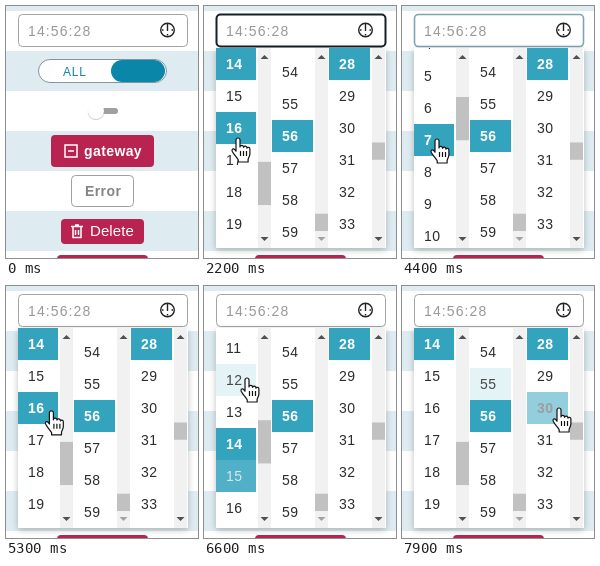
An HTML page for the animation above (8 s loop, 192 px wide and 252 px high).

```html
<!DOCTYPE html>
<html lang="en">
<head>
<meta charset="utf-8">
<title>Time picker</title>
<style>
  html, body { margin: 0; width: 100%; height: 100%; overflow: hidden; background: #fff; }
  svg { display: block; }
  text { font: 14px "Liberation Sans", Arial, sans-serif; letter-spacing: .4px; }
  .bold { font-weight: bold; }
  .stripe { fill: #deecf1; }
  .berry { fill: #b8234f; }
  .line { fill: none; stroke: #fff; stroke-width: 1.5; }
  #value { fill: #999; letter-spacing: 1.1px; }
  #popup { filter: drop-shadow(0 2px 3px rgba(0, 0, 0, .25)); }
</style>
</head>
<body>
<svg id="stage" width="192" height="252" viewBox="0 0 192 252">
  <rect width="192" height="252" fill="#fff"/>
  <path class="stripe" d="M0 0h192v5H0zM0 45h192v40H0zM0 125h192v40H0zM0 205h192v40H0z"/>

  <rect x="32.5" y="53.5" width="128" height="23" rx="11.5" fill="#fff" stroke="#84969c"/>
  <rect x="105" y="54" width="54" height="22" rx="11" fill="#0a87a8"/>
  <text x="57" y="70" fill="#0a87a8" style="font-size:12px;letter-spacing:.8px">ALL</text>

  <rect x="86" y="102" width="26" height="6" rx="3" fill="#a0a0a0"/>
  <circle cx="90" cy="106" r="8.3" fill="#000" opacity=".18"/>
  <circle cx="90" cy="105" r="8" fill="#fff"/>

  <rect class="berry" x="45" y="129" width="103" height="32" rx="4"/>
  <path class="line" d="M59 139h12v12H59zM62 145h6"/>
  <text class="bold" x="78" y="150" fill="#fff">gateway</text>

  <rect x="65.5" y="169.500" width="62" height="31" rx="4" fill="#fff" stroke="#a0a0a0"/>
  <text class="bold" x="79" y="190" fill="#858585">Error</text>

  <rect class="berry" x="55" y="213" width="83" height="25" rx="4"/>
  <path class="line" d="M65 220.500h12M69 219h4M67 221v10.500h8V221M69.500 224v5M72.500 224v5"/>
  <text x="84" y="230" fill="#fff" style="font-size:15px;letter-spacing:.1px">Delete</text>
  <rect class="berry" x="51" y="249" width="91" height="20" rx="4"/>

  <rect id="field" x="12.500" y="8.500" width="169" height="32" rx="4" fill="#fff"/>
  <text id="value" x="22" y="30">14:56:28</text>
  <g fill="none" stroke="#222" stroke-width="1.400">
    <circle cx="161.500" cy="24" r="6.800"/>
    <path d="M161.500 18v7M156 24h1.500M165.500 24h1.500M161.500 28v1.500"/>
  </g>

  <g id="popup"><rect x="12" y="42" width="170" height="200" fill="#fff"/></g>

  <g id="cursor" stroke="#111" stroke-width="1.200" stroke-linejoin="round" fill="#fff">
    <path id="arrow" d="M0 0v16l4-3.500 2.600 6 2.600-1.200L6.600 11.500H12z"/>
    <path id="hand" d="M-2 2a2 2 0 0 1 4 0v7a1.800 1.800 0 0 1 3.600.3a1.700 1.700 0 0 1 3.300.8a1.600 1.600 0 0 1 3 .8v5c0 2-1.500 4-1.800 5.500v2.600H.2v-2.200c-1.500-2.500-4.500-5.500-6-8.600c-.8-2 1.200-3.200 2.600-1.600l1.200 1.600zM5.500 13v5M2.500 13v5M8.500 13v5"/>
  </g>
</svg>
<script>
const LOOP = 8000, STEP = 100, FADE = 300;
const ROW = 32, TOP = 42, VIEW = 200, TRACK = 166;
const WHITE = [255, 255, 255], INK = [45, 45, 45], TEAL = [52, 164, 190];

const byId = id => document.getElementById(id);
const clamp = v => Math.max(0, Math.min(1, v));
const mix = (a, b, k) => `rgb(${a.map((v, i) => Math.round(v + (b[i] - v) * k))})`;

function set(node, attrs) {
  for (const name in attrs) node.setAttribute(name, attrs[name]);
  return node;
}
function add(parent, tag, attrs) {
  const node = document.createElementNS('http://www.w3.org/2000/svg', tag);
  return parent.appendChild(set(node, attrs));
}

// Linear interpolation through [time, ...values] points
function track(points, t) {
  const i = points.findIndex(p => p[0] > t);
  if (i === 0) return points[0].slice(1);
  if (i < 0) return points[points.length - 1].slice(1);
  const a = points[i - 1], b = points[i];
  const k = (t - a[0]) / (b[0] - a[0]);
  return a.slice(1).map((v, n) => v + (b[n + 1] - v) * k);
}

const cursorPath = [
  [700, 118, 86], [1200, 102, 25], [1300, 100, 24], [1600, 100, 24],
  [2000, 34, 131], [2200, 34, 132], [4300, 34, 132], [4400, 35, 133],
  [5200, 35, 133], [5700, 87, 92], [5900, 87, 92], [6100, 60, 92],
  [6300, 43, 92], [7400, 43, 92], [7900, 157, 122]
];

// Upward travel of the hours list, measured from 14 at the top
const hourShift = [
  [2300, 0], [2400, 34], [2600, 100], [3000, 100], [3600, 300], [4400, 300],
  [4600, 224], [4999, 224], [5000, 0], [6300, 0], [6500, 100],
  [6900, 100], [7100, 0]
];

// [column, number, enter, leave]
const hovers = [
  [0, 15, 1780, 1880], [0, 16, 1880, 2420], [0, 13, 2420, 2800],
  [0, 7, 3420, 4500], [0, 9, 4400, 5000], [0, 16, 4650, 5370],
  [1, 55, 5510, 5960], [0, 15, 6110, 6560], [0, 12, 6560, 6900],
  [0, 15, 6900, 7520], [1, 55, 7540, 7640], [2, 30, 7740, 9000]
];

const popup = byId('popup');

function makeColumn(x, count, width, barX) {
  const view = add(popup, 'svg', { x, y: TOP, width: 56, height: VIEW });
  const list = add(view, 'g', {});
  const rows = Array.from({ length: count }, (_, n) => {
    const box = add(list, 'rect', { y: n * ROW, width, height: ROW });
    const label = add(list, 'text', { x: 10, y: n * ROW + 21 });
    label.textContent = String(n);
    return { box, label };
  });
  add(popup, 'rect', { x: barX, y: TOP, width: 13, height: VIEW, fill: '#f1f1f1' });
  const thumb = add(popup, 'rect', {
    x: barX, width: 13, height: TRACK * VIEW / (count * ROW), fill: '#c1c1c1'
  });
  const mid = barX + 6.5;
  add(popup, 'path', { d: `M${mid - 4} 53h8l-4-4z`, fill: '#505050' });
  add(popup, 'path', { d: `M${mid - 4} 231h8l-4 4z`, fill: count === 60 && x < 100 ? '#a3a3a3' : '#505050' });
  return { list, rows, thumb, size: count * ROW };
}

const columns = [
  makeColumn(12, 24, 40, 54),
  makeColumn(68, 60, 41, 111),
  makeColumn(125, 60, 41, 168)
];

function drawColumn(index, scroll, selected, t) {
  const { list, rows, thumb, size } = columns[index];
  set(list, { transform: `translate(0 ${-scroll})` });
  set(thumb, { y: TOP + 17 + scroll * TRACK / size });
  const level = {}, bold = {};
  for (const [col, n, enter, leave] of hovers) {
    if (col !== index) continue;
    const k = Math.min(clamp((t - enter) / FADE), clamp(1 - (t - leave) / FADE));
    level[n] = Math.max(level[n] || 0, k);
    bold[n] = bold[n] || (k > .3 && t < leave);
  }
  rows.forEach(({ box, label }, n) => {
    const k = n === selected ? 1 : level[n] || 0;
    set(box, { fill: mix(WHITE, TEAL, k) });
    set(label, { fill: mix(INK, WHITE, k), class: n === selected || bold[n] ? 'bold' : '' });
  });
}

function drawField(t, hour) {
  let stroke = '#a3a3a3', width = 1;
  if (t >= 1500 && t < 4400) { stroke = '#14212a'; width = 2; }
  else if (t >= 1000 && t < 1500) stroke = '#2b2b2b';
  else if (t >= 4400 && t < 4500) { stroke = '#7fa5b2'; width = 1.6; }
  set(byId('field'), { stroke, 'stroke-width': width });
  byId('value').textContent = `${String(hour).padStart(2, '0')}:56:28`;
}

function draw(t) {
  const hour = t >= 4500 && t < 5000 ? 7 : 14;
  drawField(t, hour);

  const open = clamp((t - 1400) / FADE);
  set(popup, {
    opacity: open,
    transform: `translate(0 ${TOP}) scale(1 ${.8 + .2 * open}) translate(0 ${-TOP})`
  });
  drawColumn(0, 14 * ROW - track(hourShift, t)[0], hour, t);
  drawColumn(1, 60 * ROW - VIEW, 56, t);
  drawColumn(2, 28 * ROW, 28, t);

  const [x, y] = track(cursorPath, t);
  const arrow = t < 1500 && y > TOP;
  set(byId('cursor'), { transform: `translate(${x} ${y})`, visibility: t < 700 ? 'hidden' : 'visible' });
  set(byId('arrow'), { display: arrow ? 'inline' : 'none' });
  set(byId('hand'), { display: arrow ? 'none' : 'inline' });
}

let start, last = -1;
function tick(now) {
  if (start === undefined) start = now;
  const t = Math.floor((now - start) % LOOP / STEP) * STEP;
  if (t !== last) draw(last = t);
  requestAnimationFrame(tick);
}
draw(0);
requestAnimationFrame(tick);
</script>
</body>
</html>
```
